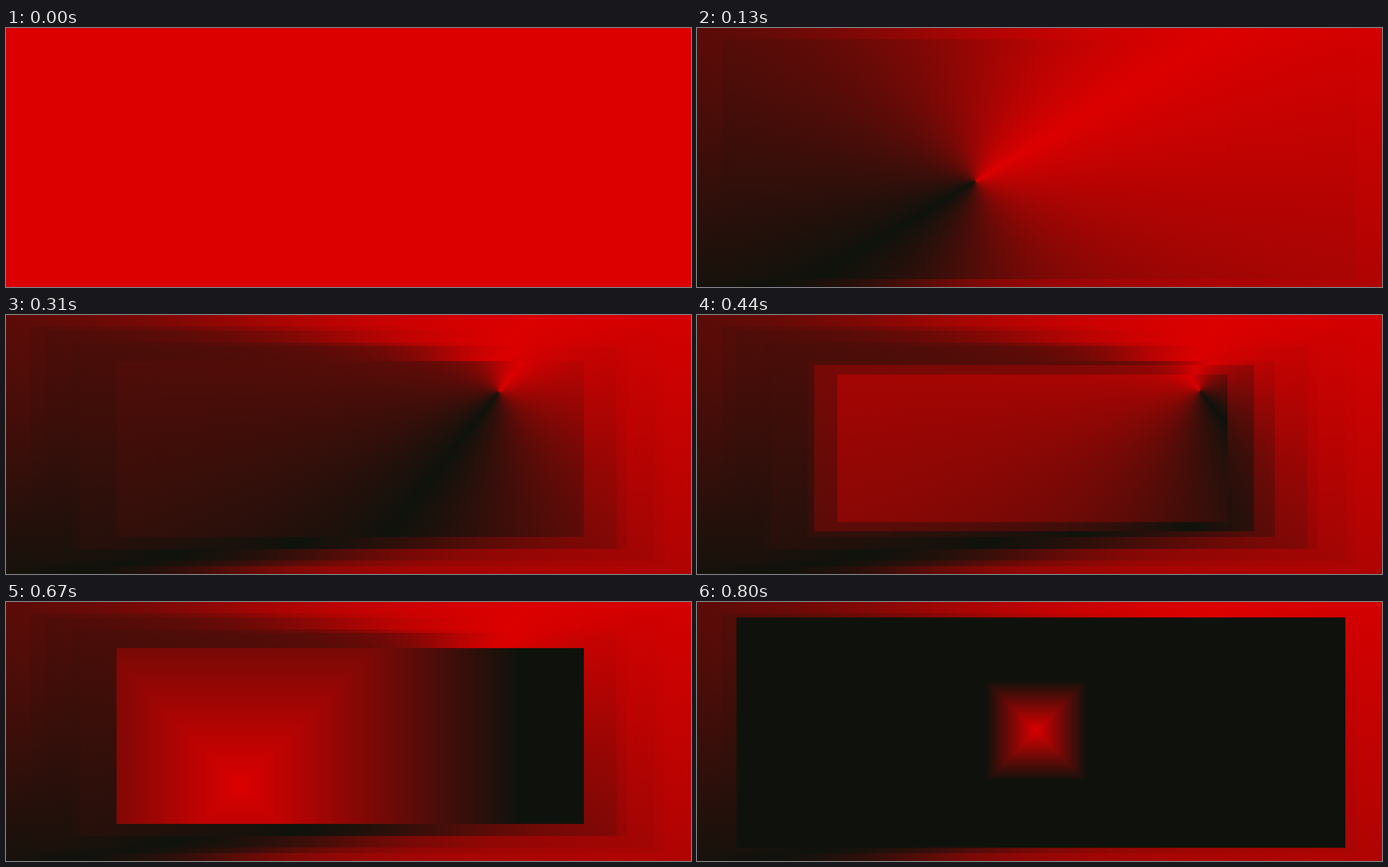
Animation, 1215 px wide and 461 px high, one loop 830 ms. Source, as an HTML page with a canvas:

```html
<!DOCTYPE html>
<html lang="en">
<head>
<meta charset="utf-8">
<title>Nested gradients</title>
<style>
  html, body { margin: 0; width: 100%; height: 100%; overflow: hidden; background: #dc0000; }
  canvas { display: block; }
</style>
</head>
<body>
<canvas id="stage" width="1215" height="461"></canvas>
<script>
const W = 1215, H = 461, LOOP = 830;
const BRIGHT = [220, 0, 0], DARK = [15, 18, 12];
const HANDLE = [1005, -30];
const ctx = document.getElementById('stage').getContext('2d');

const mix = k =>
  'rgb(' + BRIGHT.map((c, i) => Math.round(c + (DARK[i] - c) * k)).join(',') + ')';
const rad = deg => deg * Math.PI / 180;

// Angular sweep: bright along the given angle, dark on the opposite side.
function sweep(x, y, angle) {
  return () => {
    const g = ctx.createConicGradient(angle, x, y);
    g.addColorStop(0, mix(0));
    g.addColorStop(0.5, mix(1));
    g.addColorStop(1, mix(0));
    ctx.fillStyle = g;
    ctx.fillRect(0, 0, W, H);
  };
}

// The sweep centre glides along a line while its bright ray aims at the handle.
function glide(n) {
  const x = 394 + 96 * n, y = 307 - 34 * n;
  return sweep(x, y, Math.atan2(HANDLE[1] - y, HANDLE[0] - x));
}

// Concentric squares fading from bright to dark at the given radius.
function squares(x, y, radius) {
  return () => {
    ctx.fillStyle = mix(1);
    ctx.fillRect(0, 0, W, H);
    for (let r = radius; r > 0; r--) {
      ctx.fillStyle = mix(r / radius);
      ctx.fillRect(x - r, y - r, 2 * r, 2 * r);
    }
  };
}

// Each step paints a box [left, top, right, bottom] over what is already there.
const INNER = [249, 106, 941, 368.5];
const steps = [
  { at: 30, box: [0, 0, W, H], paint: glide(0) },
  { at: 130, box: [43, 20, 1168, 447], paint: sweep(494, 273, rad(-31)) },
  { at: 150, box: [70, 28, 1150, 437], paint: glide(2) },
  { at: 180, box: [117, 49, 1101, 417], paint: glide(3) },
  { at: 280, box: [132, 55, 1083, 416], paint: glide(4) },
  { at: 310, box: [196, 82, 1025, 395], paint: sweep(874, 137, rad(-52)) },
  { at: 410, box: [208, 89, 988, 385], paint: sweep(883, 136, rad(-88)) },
  { at: 440, box: INNER, paint: sweep(892, 135, rad(-128)) },
  { at: 540, box: INNER, paint: squares(490, 237, 600) },
  { at: 570, box: INNER, paint: squares(452, 281, 560) },
  { at: 670, box: [196, 82, 1025, 395], paint: squares(415, 325, 495) },
  { at: 700, box: [132, 55, 1083, 416.5], paint: squares(377, 369, 428) },
  { at: 800, box: [70, 27.5, 1150, 437.5], paint: squares(601.5, 228.5, 90) }
];

function paintStep({ box: [l, t, r, b], paint }) {
  ctx.save();
  ctx.beginPath();
  ctx.rect(l, t, r - l, b - t);
  ctx.clip();
  paint();
  ctx.restore();
}

let shown = -1;
function draw(time) {
  const count = steps.filter(s => s.at <= time).length;
  if (count === shown) return;
  shown = count;
  ctx.fillStyle = mix(0);
  ctx.fillRect(0, 0, W, H);
  steps.slice(0, count).forEach(paintStep);
}

const start = performance.now();
function tick() {
  draw((performance.now() - start) % LOOP);
  requestAnimationFrame(tick);
}
tick();
</script>
</body>
</html>
```
